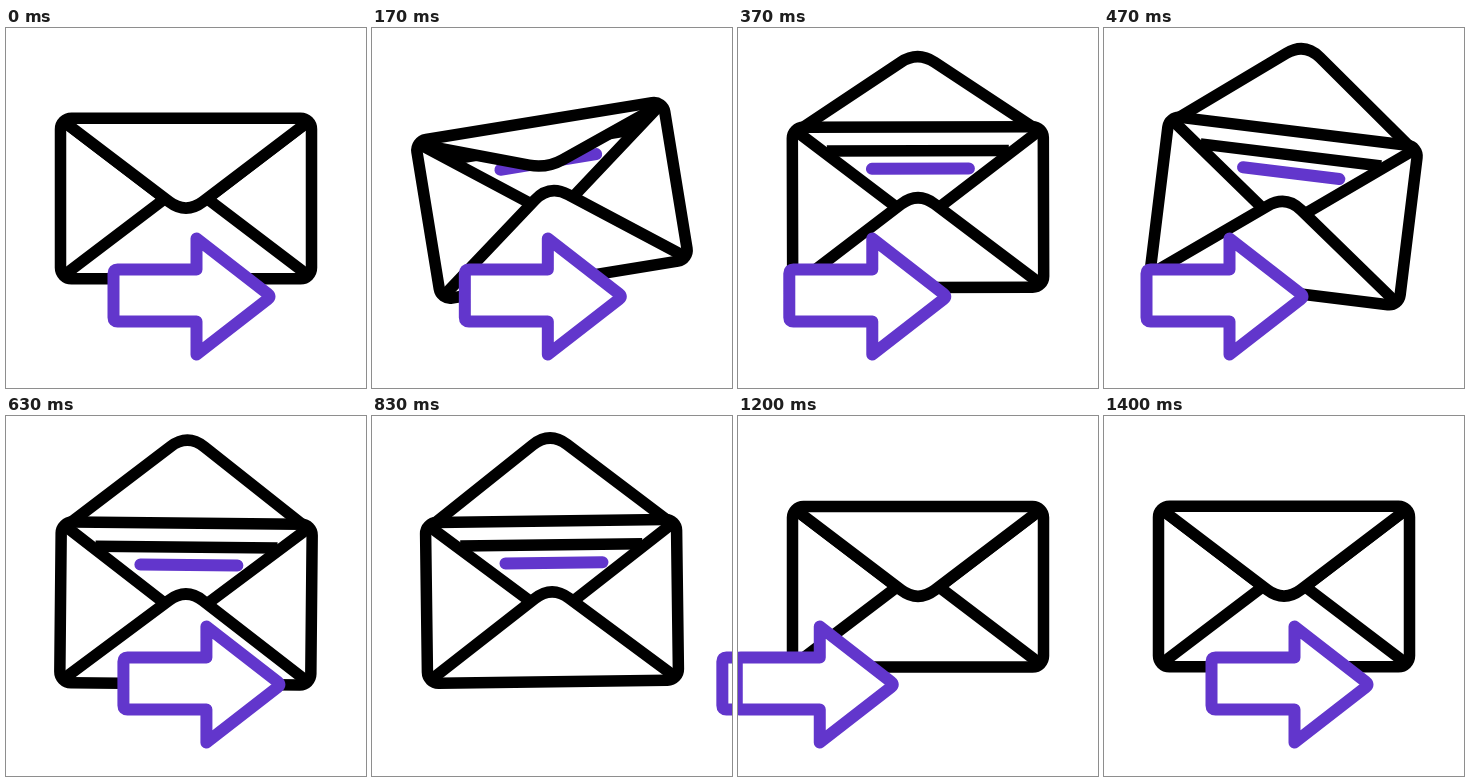
An HTML page that plays this animation: 360x360 px, repeating every 1670 ms.

```html
<!DOCTYPE html>
<html lang="en">
<head>
<meta charset="utf-8">
<title>Send mail</title>
<style>
  html, body { margin: 0; height: 100%; overflow: hidden; background: #fff; }
  svg { display: block; width: 100vw; height: 100vh; }
  path, rect { fill: #fff; stroke: #000; stroke-width: 11.5; stroke-linejoin: round; }
  .line { fill: none; }
  .accent { stroke: #6236cc; stroke-width: 12; stroke-linecap: round; }
</style>
</head>
<body>
<svg viewBox="0 0 360 360">
  <g id="envelope">
    <path class="line" d="M-91 -56.5H91"/>
    <path class="line accent" d="M-46 -38.5H51"/>
    <path class="line" d="M-121 -76L-20 1M121 -76L20 1"/>
    <path d="M-121 76L-17 -3Q0 -16 17 -3L121 76"/>
    <path id="flap"/>
    <rect class="line" x="-125.5" y="-80.3" width="251" height="160.6" rx="11"/>
  </g>
  <path id="arrow" class="accent" d="M111.5 241.5H190.5V210.5L262 266Q265 268.5 262 271L190.5 326.5V293.5H111.5Q107.5 293.5 107.5 289.5V245.5Q107.5 241.5 111.5 241.5Z"/>
</svg>
<script>
  const LOOP = 1670, FPS = 30;

  // Keyframes: [tick, value], eased in and out between neighbours
  const arrowX = [[1, 0], [14, -65], [15.2, -65], [28.2, 298], [28.2, -270], [42, 0]];
  const drop = [[1, 0], [21, 17.5], [37.3, 0]];
  const tilt = [[1, 0], [6.8, -12], [14, 7], [21.5, -1.7], [28, 0]];
  const opening = [[1, 0], [13, 1], [25, 1], [33.3, 0]];

  const $ = id => document.getElementById(id);
  const envelope = $('envelope'), flap = $('flap'), arrow = $('arrow');

  function at(keys, tick) {
    const next = keys.findIndex(key => key[0] > tick);
    if (next === 0) return keys[0][1];
    if (next < 0) return keys[keys.length - 1][1];
    const [t0, v0] = keys[next - 1], [t1, v1] = keys[next];
    const u = (tick - t0) / (t1 - t0);
    return v0 + (v1 - v0) * u * u * (3 - 2 * u);
  }

  function flapPath(open) {
    const base = -76, apex = 16 - 186 * open;
    const shoulder = apex - (apex - base) * 17 / 121;
    return `M-121 ${base}L-17 ${shoulder}Q0 ${apex} 17 ${shoulder}L121 ${base}`;
  }

  function draw(now) {
    const tick = Math.floor((now % LOOP + 5) * FPS / 1000);
    envelope.setAttribute('transform',
      `translate(180 ${170.5 + at(drop, tick)}) rotate(${at(tilt, tick)})`);
    flap.setAttribute('d', flapPath(at(opening, tick)));
    arrow.setAttribute('transform', `translate(${at(arrowX, tick)})`);
  }

  let start;
  function loop(now) {
    start ??= now;
    draw(now - start);
    requestAnimationFrame(loop);
  }
  draw(0);
  requestAnimationFrame(loop);
</script>
</body>
</html>
```
